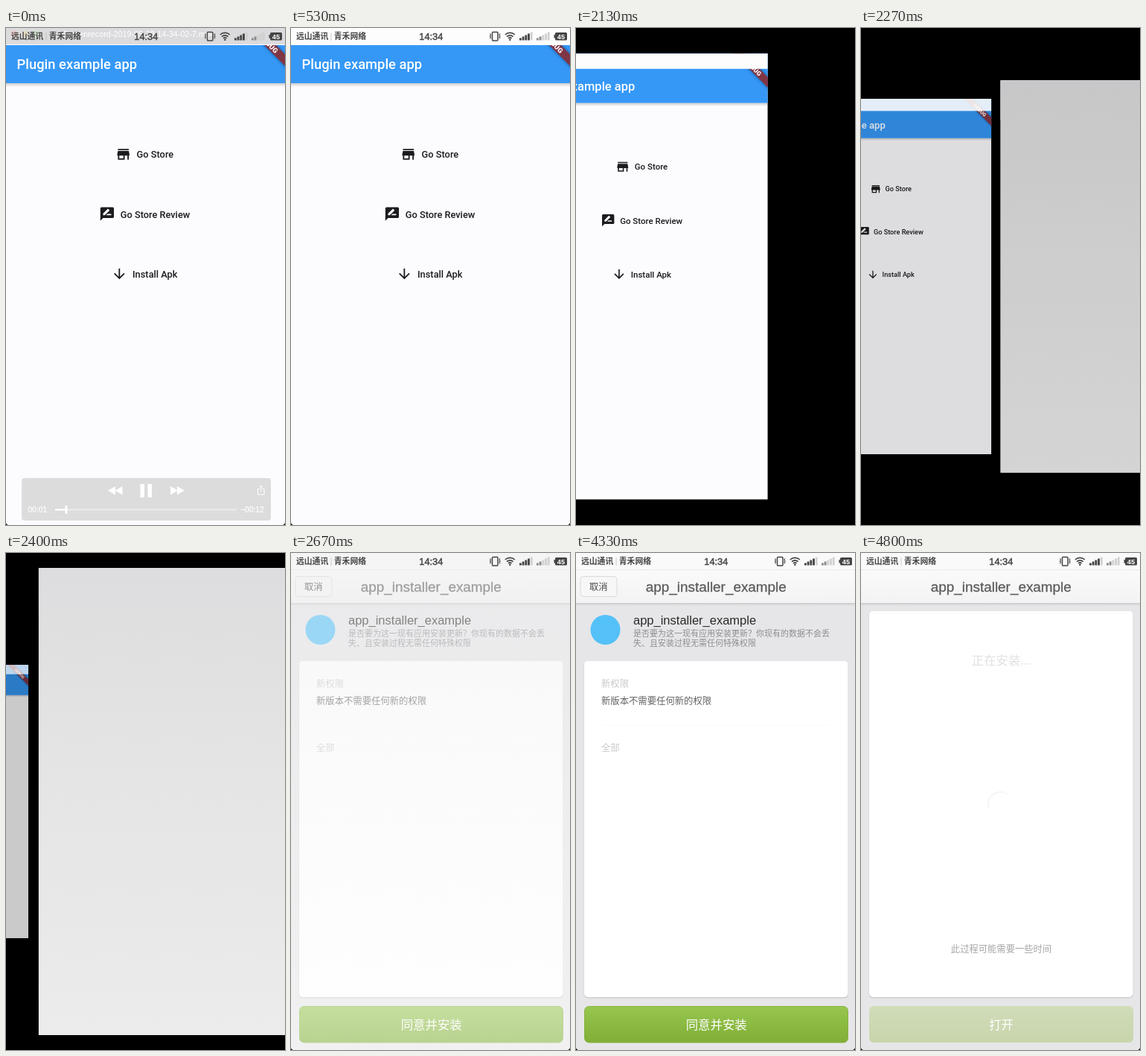
An HTML page that plays this animation: 375 by 667 pixels, repeating every 4870 ms.

```html
<!DOCTYPE html>
<html lang="zh-CN">
<head>
<meta charset="utf-8">
<title>Plugin example app</title>
<style>
  html, body { margin: 0; width: 100%; height: 100%; overflow: hidden; background: #000; }
  svg { display: block; width: 375px; height: 667px; }
  text { font-family: "Noto Sans CJK SC", "Noto Sans CJK", sans-serif; white-space: pre; }
  .roboto { font-family: Roboto, sans-serif; font-weight: 500; }
  .arial { font-family: "Liberation Sans", Arial, sans-serif; }
  .mid { text-anchor: middle; }
</style>
</head>
<body>
<svg viewBox="0 0 375 667">
  <defs>
    <linearGradient id="shade" x2="0" y2="1">
      <stop stop-color="#000" stop-opacity=".2"/><stop offset="1" stop-color="#000" stop-opacity="0"/>
    </linearGradient>
    <linearGradient id="head" x2="0" y2="1">
      <stop stop-color="#fafafa"/><stop offset="1" stop-color="#f3f3f3"/>
    </linearGradient>
    <linearGradient id="green" x2="0" y2="1">
      <stop stop-color="#97c750"/><stop offset="1" stop-color="#80ae36"/>
    </linearGradient>
    <linearGradient id="pale" x2="0" y2="1">
      <stop stop-color="#d1dcb9"/><stop offset="1" stop-color="#c7d5ab"/>
    </linearGradient>
    <linearGradient id="mist" x2="0" y2="1">
      <stop stop-color="#eeeef0"/><stop offset=".4" stop-color="#f5f5f5"/><stop offset="1" stop-color="#fefefe"/>
    </linearGradient>
    <filter id="soft" x="-20%" y="-100%" width="140%" height="300%"><feGaussianBlur stdDeviation="2.2"/></filter>
    <clipPath id="page"><rect width="375" height="667"/></clipPath>
  </defs>
  <rect width="375" height="667"/>

  <g id="home" clip-path="url(#page)">
    <rect width="375" height="667" fill="#fcfcfe"/>
    <rect y="74" width="375" height="5" fill="url(#shade)"/>
    <rect width="375" height="74" fill="#3598f7"/>
    <text class="roboto" x="14.6" y="55.4" font-size="18.35" fill="#fff">Plugin example app</text>
    <g font-size="12.82" fill="#1c1c1e">
      <path transform="translate(146.8 158.5) scale(.9115)" d="M20 4H4v2h16V4zm1 10v-2l-1-5H4l-1 5v2h1v6h10v-6h4v6h2v-6h1zm-9 4H6v-4h6v4z"/>
      <path transform="translate(125 238.6) scale(.9115)" d="M20 2H4c-1.1 0-2 .9-2 2v18l4-4h14c1.1 0 2-.9 2-2V4c0-1.1-.9-2-2-2zM6 14v-2.5l6.9-6.9q.35-.3.7 0l1.8 1.8q.3.35 0 .7L8.5 14H6zm12 0h-7.5l2-2H18v2z"/>
      <path transform="translate(141.4 319.1) scale(.9115)" d="M20 12l-1.4-1.4-5.6 5.6V4h-2v12.2l-5.6-5.6L4 12l8 8 8-8z"/>
      <text class="roboto" x="175.6" y="174">Go Store</text>
      <text class="roboto" x="153.7" y="254.5">Go Store Review</text>
      <text class="roboto" x="170" y="334.8">Install Apk</text>
    </g>
    <g transform="translate(375 0) rotate(45)">
      <rect x="-40" y="25" width="80" height="10.9" opacity=".5" filter="url(#soft)"/>
      <rect x="-40" y="25" width="80" height="10.9" fill="#803545"/>
      <text class="roboto mid" y="33.8" font-size="9.3" style="font-weight:900" fill="#fff">DEBUG</text>
    </g>
    <rect id="homeDim" width="375" height="667" opacity="0"/>
    <rect id="strip" width="375" height="23" fill="#fdfdfe"/>
  </g>

  <g id="installer" clip-path="url(#page)">
    <rect width="375" height="667" fill="#e6e6e8"/>
    <rect y="67" width="375" height="4" fill="url(#shade)" opacity=".6"/>
    <rect width="375" height="23" fill="#fafafa"/>
    <rect y="23" width="375" height="44" fill="url(#head)"/>
    <path d="M0 22.5H375" stroke="#e9e9e9"/>
    <text class="arial mid" x="188.3" y="52" font-size="18.9" fill="#5c5c5c" stroke="#5c5c5c" stroke-width=".3">app_installer_example</text>

    <g id="ask">
      <rect x="6" y="31.5" width="49" height="27" rx="4" fill="#f7f7f7" stroke="#dadada"/>
      <text class="mid" x="30.3" y="49.6" font-size="12.3" font-weight="500" fill="#4a4a4a">取消</text>
      <circle cx="39.5" cy="103" r="20" fill="#54c1f8"/>
      <text class="arial" x="77" y="96" font-size="16.5" fill="#2a2a2a">app_installer_example</text>
      <g font-size="11" fill="#8e8e90">
        <text x="77" y="111.6">是否要为这一现有应用安装更新？你现有的数据不会丢</text>
        <text x="77" y="125">失、且安装过程无需任何特殊权限</text>
      </g>
      <rect x="10.5" y="146" width="355.5" height="451.5" rx="5" fill="#cfcfd1"/>
      <rect x="11" y="145" width="354.5" height="451" rx="5" fill="#fff"/>
      <g font-size="12.35" fill="#c9c9c9">
        <text x="34" y="180.2">新权限</text>
        <text x="34" y="203.3" fill="#626262">新版本不需要任何新的权限</text>
        <text x="34" y="266">全部</text>
      </g>
      <path d="M34 231.5H342" stroke="#f9f9f9"/>
      <rect x="11.5" y="608.5" width="354" height="48.5" rx="6" fill="url(#green)" stroke="#86b33f"/>
      <text class="mid" x="188.7" y="638.8" font-size="16.4" fill="#fff">同意并安装</text>
    </g>

    <g id="busy" opacity="0">
      <rect x="10.5" y="79" width="355.5" height="518.5" rx="5" fill="#cfcfd1"/>
      <rect x="11" y="78" width="354.5" height="518" rx="5" fill="#fff"/>
      <text x="148.8" y="149.6" font-size="16.4" fill="#e1e1e1">正在安装...</text>
      <path d="M171.5 343A17 17 0 0 1 197 323.5" fill="none" stroke="#f7f7f7" stroke-width="2.5"/>
      <text class="mid" x="188.5" y="536.4" font-size="12.3" fill="#a6a6a6">此过程可能需要一些时间</text>
      <rect x="11" y="608" width="355" height="49" rx="6" fill="url(#pale)"/>
      <text class="mid" x="188.6" y="638.8" font-size="16.4" fill="#fff">打开</text>
    </g>
    <rect id="veil" width="375" height="667" fill="url(#mist)"/>
    <rect id="newDim" width="375" height="667"/>
  </g>

  <g id="player" fill="#fff">
    <rect width="375" height="22" fill="#d4d4d5" opacity=".8"/>
    <g opacity=".45">
      <circle cx="11" cy="8" r="4.5" fill="#f3a3a3"/>
      <circle cx="26" cy="8" r="4.5" fill="#efdca6"/>
      <circle cx="41" cy="8" r="4.5" fill="#b2dcae"/>
    </g>
    <text class="arial" x="76" y="12.3" font-size="10.8">Screenrecord-2019-05-28-14-34-02-7.mp4</text>
    <rect x="21" y="604" width="335" height="57" rx="4" fill="#dcdcdc"/>
    <path d="M147 615v11.5l-10-5.75zM156.5 615v11.5l-10-5.75zM221 615v11.5l10-5.75zM230 615v11.5l10-5.75z"/>
    <path d="M180.5 612h5.5v18h-5.5zM190.5 612h5.5v18h-5.5z"/>
    <path d="M340.5 618.5h-2v7.5h8.5v-7.5h-2M342.75 622v-7.5M340.5 616.5l2.25-2.3 2.25 2.3" fill="none" stroke="#fff"/>
    <g font-size="10.3" stroke="#fff" stroke-width=".2">
      <text class="arial" x="29.5" y="650">00:01</text>
      <text class="arial" x="315" y="650">−00:12</text>
    </g>
    <rect x="66" y="645.5" width="244" height="2" opacity=".45"/>
    <rect x="66" y="645.5" width="14" height="2"/>
    <rect x="79.5" y="641" width="3" height="11" rx="1"/>
  </g>

  <g id="status" fill="#444">
    <g font-size="10.8" font-weight="700">
      <text x="7" y="15.4">远山通讯</text>
      <text x="57.8" y="15.4">青禾网络</text>
    </g>
    <path d="M54 6.5V17" stroke="#bbb" stroke-width=".8"/>
    <text class="arial mid" x="188.3" y="15.9" font-size="12.8" stroke="#444" stroke-width=".45">14:34</text>
    <g fill="none" stroke="#444" stroke-width="1.5">
      <rect x="270.5" y="5.5" width="7.5" height="11.5" rx="1"/>
      <path d="M267.5 7.5l1 1.7-1 1.7 1 1.7-1 1.7M281 7.5l-1 1.7 1 1.7-1 1.7 1 1.7" stroke-width="1.1"/>
      <path d="M287.8 9a9.3 9.3 0 0 1 13 0M290 11.6a6.2 6.2 0 0 1 8.6 0M292 14a3.4 3.4 0 0 1 4.6 0" stroke-width="1.6"/>
    </g>
    <circle cx="294.3" cy="15.7" r="1.3"/>
    <g id="bars"></g>
    <path d="M356.5 6h13a1.5 1.5 0 0 1 1.5 1.5v7.5a1.5 1.5 0 0 1-1.5 1.5h-13a1.5 1.5 0 0 1-1.5-1.5v-1.5h-1.5v-4.5h1.5V7.5a1.5 1.5 0 0 1 1.5-1.5z"/>
    <text class="arial mid" x="363" y="14.7" font-size="9.3" font-weight="700" fill="#fff">45</text>
  </g>
  <path d="M0 663.5Q.3 666.7 3.5 667H0zM375 663.5Q374.7 666.7 371.5 667H375z"/>
</svg>
<script>
const LOOP = 4870, STEP = 1000 / 15;
const $ = id => document.getElementById(id);

// Each row: time, then the values at that time
const HOME = [ // scale, centre x, dim, strip opacity
  [1933, 1, 187.5, 0, 1], [2000, .985, 167, 0, 1], [2067, .95, 127, 0, 1],
  [2133, .898, 89.6, 0, 1], [2200, .81, 63, .06, .95], [2267, .715, 41, .12, .88],
  [2333, .62, -26, .16, .8], [2400, .55, -73, .2, .7], [2467, .5, -97, .24, .6]
];
const NEXT = [ // scale, centre x, dim
  [2133, .68, 520, .24], [2200, .725, 425, .2], [2267, .79, 335, .165], [2333, .87, 268, .12],
  [2400, .94, 220, .07], [2467, .985, 195, .03], [2533, 1, 187.5, 0]
];
const VEIL = [[2467, 1], [2533, .72], [2600, .72], [2667, .45], [3133, 0]];
const BUSY = [[4533, 0], [4800, 1]];
const PLAYER = [[0, 1], [67, .45], [133, 0]];

function at(rows, t) {
  if (t <= rows[0][0]) return rows[0].slice(1);
  for (let i = 1; i < rows.length; i++) {
    const a = rows[i - 1], b = rows[i];
    if (t <= b[0]) {
      const k = (t - a[0]) / (b[0] - a[0]);
      return a.slice(1).map((v, j) => v + (b[j + 1] - v) * k);
    }
  }
  return rows[rows.length - 1].slice(1);
}

const fade = (id, v) => $(id).setAttribute('opacity', v);
const show = (id, on) => $(id).setAttribute('display', on ? 'inline' : 'none');
const place = (id, s, cx) => $(id).setAttribute('transform',
  `translate(${cx} 333.5) scale(${s}) translate(-187.5 -333.5)`);

function signal(x, lit, color) {
  let out = '';
  for (let i = 0; i < 5; i++) {
    const h = 3 + i * 2;
    out += `<rect x="${x + i * 3.7}" y="${16.5 - h}" width="2.8" height="${h}" fill="${i < lit ? color : '#d0d0d0'}"/>`;
  }
  return out;
}
$('bars').innerHTML = signal(307, 4, '#444') + signal(330, 2, '#888');

function draw(time) {
  const t = Math.min(72, Math.floor((time % LOOP + 3.4) / STEP)) * STEP;
  const [hs, hx, dim, strip] = at(HOME, t);
  const [ns, nx, shade] = at(NEXT, t);
  const [busy] = at(BUSY, t);

  place('home', hs, hx);
  fade('homeDim', dim);
  fade('strip', strip);
  show('home', t < 2530);

  place('installer', ns, nx);
  fade('newDim', shade);
  fade('veil', at(VEIL, t)[0]);
  fade('ask', 1 - busy * busy);
  fade('busy', busy);
  show('installer', t > 2140);

  show('status', t < 1999 || t > 2530);
  fade('player', at(PLAYER, t)[0]);
}

const start = performance.now();
function tick() {
  draw(performance.now() - start);
  requestAnimationFrame(tick);
}
tick();
</script>
</body>
</html>
```
